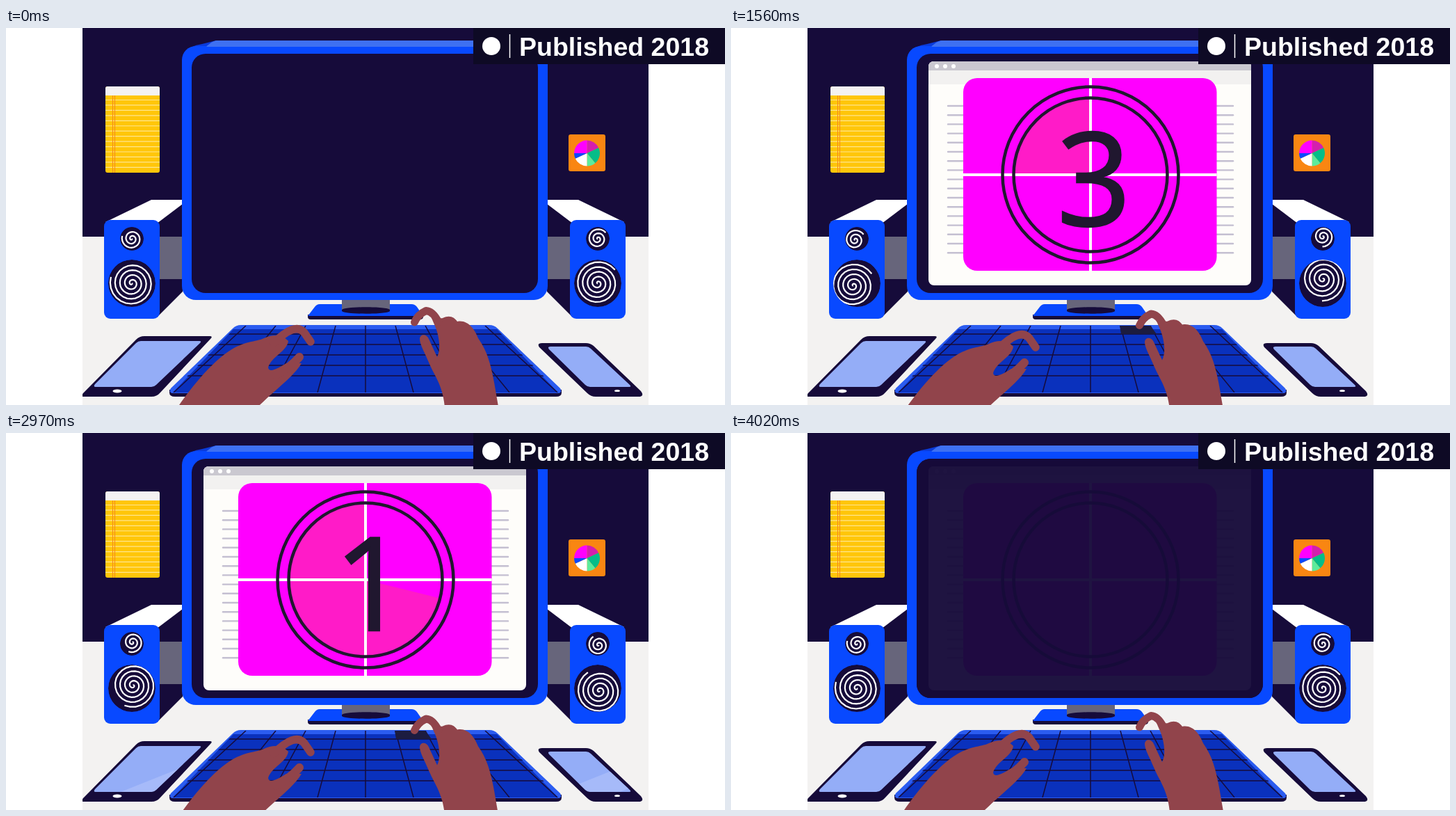
An HTML page that plays this animation: 1034x542 px, repeating every 4.05 s.

```html
<!DOCTYPE html>
<html lang="en">
<head>
<meta charset="utf-8">
<title>Countdown on a desk</title>
<style>
  html, body { margin: 0; width: 100%; height: 100%; overflow: hidden; background: #fff; }
  svg { display: block; width: 100%; height: 100%; }
  .dark { fill: #160b3a; }
  .blue { fill: #0849ff; }
  .hand { fill: #91444b; }
  .finger { fill: none; stroke: #91444b; stroke-linecap: round; stroke-linejoin: round; }
  .digit { font: 187px "Open Sans", "Noto Sans", sans-serif; text-anchor: middle; fill: #20172f; stroke: #20172f; stroke-width: 2.5; }
  .banner { font: bold 37.5px "Liberation Sans", Arial, sans-serif; fill: #fff; }
</style>
</head>
<body>
<svg viewBox="0 0 1034 542">
  <defs>
    <clipPath id="scene"><path d="M110 0H924V542H110Z"/></clipPath>
    <clipPath id="leftGlass"><path d="M194 450H278Q282 450 279 453L216 513Q213 516 209 516H129Q125 516 128 512L187 453Q190 450 194 450Z"/></clipPath>
    <clipPath id="rightGlass"><path d="M783 458H834Q838 458 841 461L897 513Q900 516 896 516H840Q836 516 833 513L781 462Q778 458 783 458Z"/></clipPath>
    <clipPath id="keys"><path d="M333 428H700L797 524H237Z"/></clipPath>
    <path id="band" d="M100 80L300 0V35L100 115Z" fill="#b1c2fb" opacity=".65"/>
    <g id="cabinet">
      <path d="M143 279L209 247H254V254L219 280Z" fill="#fff"/>
      <path class="dark" d="M217 281L254 253V379L217 416Z"/>
      <path d="M221 300H254V361H221Z" fill="#67657b"/>
      <rect class="blue" x="141" y="276" width="80" height="142" rx="9"/>
    </g>
  </defs>

  <g clip-path="url(#scene)">
    <path fill="#f3f2f1" d="M110 300H924V542H110Z"/>
    <path class="dark" d="M110 0H924V300H110Z"/>

    <rect x="143" y="84" width="78" height="124" rx="3" fill="#ffc60a"/>
    <path d="M143 97V87Q143 84 146 84H218Q221 84 221 87V97Z" fill="#f4f2f2"/>
    <g id="notes" stroke="#ffe58d" stroke-width="1.2"></g>
    <path d="M153.5 97V208M156.5 97V208" stroke="#f6861f"/>

    <rect x="809" y="153" width="53" height="53" rx="3" fill="#f98612"/>
    <g id="pie"></g>

    <use href="#cabinet"/>
    <use href="#cabinet" transform="translate(1032) scale(-1 1)"/>
    <g id="cones"></g>

    <path class="dark" d="M434 412H600V415Q600 419 595 419H438Q434 419 434 415Z"/>
    <path class="blue" d="M451 397H583Q588 397 591 401L600 414H434L444 401Q447 397 451 397Z"/>
    <path d="M483 388H552V406H483Z" fill="#67657b"/>
    <path class="dark" d="M483 405C487 400 548 400 552 405V407C548 412 487 412 483 407Z"/>

    <path d="M256 37Q264 25 282 23L302 18H340V40Z" fill="#0a3bdc"/>
    <path d="M286 28L294 22Q299 18 306 18H757Q770 18 776 32Z" fill="#3e70f2"/>
    <rect class="blue" x="253" y="26" width="526" height="365" rx="20"/>
    <path d="M288 27L294 22Q299 18 306 18H757V27Z" fill="#3e70f2"/>
    <rect class="dark" x="267" y="37" width="498" height="344" rx="20"/>

    <g id="window">
      <rect x="284" y="48" width="464" height="322" rx="8" fill="#fefdfa"/>
      <path d="M284 81V56Q284 48 292 48H740Q748 48 748 56V81Z" fill="#f2f1f0"/>
      <path d="M284 61V56Q284 48 292 48H740Q748 48 748 56V61Z" fill="#cac8d0"/>
      <g fill="#fff"><circle cx="296" cy="55" r="3"/><circle cx="308" cy="55" r="3"/><circle cx="320" cy="55" r="3"/></g>
      <g id="lines" stroke="#c4bfd1" stroke-width="2.4" stroke-linecap="round"></g>
    </g>

    <g id="panel">
      <rect x="334" y="72" width="364.500" height="277" rx="20" fill="#f0f"/>
      <path id="wedge" fill="#ff1bc8"/>
      <path d="M334 211H698.500M517 72V349" stroke="#fff" stroke-width="4"/>
      <g fill="none" stroke="#20172f" stroke-width="4.500">
        <circle cx="517" cy="211" r="126.500"/><circle cx="517" cy="211" r="110.500"/>
      </g>
      <text class="digit" x="522" y="284">3</text>
      <text class="digit" x="522" y="284">2</text>
      <text class="digit" x="525" y="284">1</text>
    </g>
    <rect id="blackout" class="dark" x="267" y="37" width="498" height="344" rx="20"/>

    <path class="dark" d="M199 443H293Q298 443 294 447L222 524Q217 530 209 530H112Q107 530 111 525L187 448Q192 443 199 443Z"/>
    <g clip-path="url(#leftGlass)"><path d="M110 440H300V530H110Z" fill="#94adf7"/><use class="glare" href="#band"/></g>
    <ellipse cx="160" cy="522" rx="6.500" ry="2.500" fill="#fff"/>
    <path class="dark" d="M771 453H834Q840 453 845 457L913 522Q919 530 909 530H848Q841 530 836 525L767 459Q763 453 771 453Z"/>
    <g clip-path="url(#rightGlass)"><path d="M766 450H916V530H766Z" fill="#94adf7"/><use class="glare" href="#band" x="630"/></g>
    <ellipse cx="879" cy="521.500" rx="4" ry="1.600" fill="#fff"/>

    <path class="dark" d="M235 520H799V524Q799 530 791 530H243Q235 530 235 524Z"/>
    <path d="M338 427H695Q702 427 707 432L797 518Q801 525 793 525H241Q233 525 237 518L326 432Q331 427 338 427Z" fill="#2b5cf0"/>
    <path d="M327 433H706L794 524H240Z" fill="#0a31bd"/>
    <g id="grid" clip-path="url(#keys)" stroke="#160b3a" stroke-width="1.500"></g>
    <path id="pressed" d="M559 428H603L612 440H561Z" fill="#1c1c40"/>

    <g id="leftHand">
      <path class="hand" d="M237 560C260 524 292 484 320 465C344 449 358 452 371 446C386 439 398 442 406 450C404 465 382 472 377 488C378 497 392 489 403 482L425 482C411 505 385 520 347 560Z"/>
      <path class="finger" stroke-width="11.500" d="M385 453C405 433 420 427 429 438L438 451"/>
      <path class="finger" stroke-width="12" d="M388 499Q409 488 422 473"/>
    </g>
    <g id="rightHand">
      <path class="hand" d="M610 412C618 411 623 419 628 417C638 412 645 416 649 422C664 419 674 433 679 446C700 475 701 510 711 560H631C633 520 616 500 609 483C602 466 595 455 595 447C596 439 605 440 608 447L620 473C626 462 623 440 615 424Z"/>
      <path class="finger" stroke-width="11" d="M587.500 423Q592 412 604 406.500Q614 407 622 423"/>
    </g>
  </g>

  <path d="M672 0H1034V52H672Z" fill="#0e0a25"/>
  <circle cx="698" cy="26" r="13" fill="#fff"/>
  <path d="M724.500 9V43" stroke="#fff" stroke-width="1.500"/>
  <text class="banner" x="738" y="40">Published 2018</text>
</svg>

<script>
const LOOP = 4050, STEP = 30;
const $ = id => document.getElementById(id);
const set = (el, attrs) => { for (const k in attrs) el.setAttribute(k, attrs[k]); };
const progress = (t, start, length) => Math.min(1, Math.max(0, (t - start) / length));
const easeInOut = p => p < .5 ? 2 * p * p : 1 - 2 * (1 - p) ** 2;
const repeat = (n, fn) => Array.from({ length: n }, (_, i) => fn(i)).join('');

// Pie slice; angles in degrees, clockwise from the top.
function sector(cx, cy, r, from, to) {
  const point = deg => {
    const a = deg * Math.PI / 180;
    return `${cx + r * Math.sin(a)} ${cy - r * Math.cos(a)}`;
  };
  return `M${cx} ${cy}L${point(from)}A${r} ${r} 0 ${to - from > 180 ? 1 : 0} 1 ${point(to)}Z`;
}

function spiral(radius, turns) {
  const steps = Math.round(turns * 24);
  return 'M' + Array.from({ length: steps + 1 }, (_, i) => {
    const a = i / 24 * 2 * Math.PI, r = radius * i / steps;
    return `${(r * Math.cos(a)).toFixed(1)} ${(r * Math.sin(a)).toFixed(1)}`;
  }).join('L');
}

$('notes').innerHTML = repeat(14, i => `<path d="M143 ${103.5 + i * 7.45}H221"/>`);
$('lines').innerHTML = repeat(17, i => `<path d="M312 ${112 + i * 13.2}H722"/>`);
$('grid').innerHTML =
  repeat(9, i => `<path d="M${517 + (i - 4) * 43} 428L${517 + (i - 4) * 69} 524"/>`) +
  [440, 455, 470, 485, 500].map(y => `<path d="M235 ${y}H800"/>`).join('');

const slices = [[0, 65, '#d41fae'], [65, 140, '#05bd88'], [140, 180, '#5ceb9c'],
  [180, 245, '#fff'], [245, 270, '#0849ff'], [270, 360, '#f0f']];
$('pie').innerHTML = slices.map(([a, b, color]) =>
  `<path d="${sector(835.5, 180, 18.5, a, b)}" fill="${color}"/>`).join('');

const cones = [[181, 303, 17, 2.5, 17], [181, 367, 34, 4.5, 17], [851, 303, 17, 2.5, 142], [851, 367, 34, 4.5, 142]]
  .map(([x, y, r, turns, phase], i) => {
    $('cones').insertAdjacentHTML('beforeend',
      `<clipPath id="cone${i}"><circle r="${r}"/></clipPath>
       <g transform="translate(${x} ${y})" clip-path="url(#cone${i})">
         <circle class="dark" r="${r}"/>
         <path d="${spiral(r - 2.5, turns)}" fill="none" stroke="#fff" stroke-width="2.2"/>
       </g>`);
    return { path: $('cones').lastElementChild.lastElementChild, r, phase };
  });

const growFrom = (el, cx, cy, scale, opacity) => set(el, {
  transform: `translate(${cx} ${cy}) scale(${scale}) translate(${-cx} ${-cy})`, opacity
});

const digits = document.querySelectorAll('.digit');
const glares = document.querySelectorAll('.glare');
const sweepStarts = [1020, 1908, 2762], SWEEP = 720;
const glareStarts = [330, 2190];

function drawCountdown(t) {
  const fades = [0, progress(t, 1680, 150), progress(t, 2550, 150), progress(t, 3480, 150)];
  digits.forEach((digit, i) =>
    set(digit, { opacity: (i ? fades[i] : 1) * (1 - fades[i + 1]) }));

  // The wedge fades back in shortly before each new sweep.
  const round = t < sweepStarts[1] - 120 ? 0 : t < sweepStarts[2] - 120 ? 1 : 2;
  const start = sweepStarts[round];
  const angle = 360 * progress(t, start, SWEEP);
  set($('wedge'), {
    d: angle < 360 ? sector(517, 211, 110, angle, 359.99) : '',
    opacity: round ? progress(t, start - 120, 120) : 1
  });
}

function draw(t) {
  const press = easeInOut(progress(t, 30, 120)) * (1 - easeInOut(progress(t, 3690, 150)));
  set($('leftHand'), { transform: `translate(0 ${8 * press})` });
  set($('rightHand'), { transform: `translate(0 ${4.5 * press})` });
  set($('pressed'), { opacity: press > .5 ? 1 : 0 });

  const open = progress(t, 120, 270), grow = progress(t, 330, 330);
  growFrom($('window'), 516, 247, easeInOut(open), open);
  growFrom($('panel'), 517, 247, easeInOut(grow), grow);
  drawCountdown(t);
  set($('blackout'), { opacity: progress(t, 3720, 312) });

  const spin = progress(t, 300, 3480);
  for (const { path, r, phase } of cones) {
    const shift = r * .2 * Math.sin(Math.PI * spin);
    set(path, { transform: `rotate(${phase + 360 * spin}) translate(${shift} 0)` });
  }

  const begun = glareStarts.filter(start => t >= start).pop() ?? -2000;
  const y = 388 + .095 * (t - begun);
  glares.forEach(glare => set(glare, { y }));
}

function tick(now) {
  draw(Math.floor(now % LOOP / STEP) * STEP);
  requestAnimationFrame(tick);
}
draw(0);
requestAnimationFrame(tick);
</script>
</body>
</html>
```
